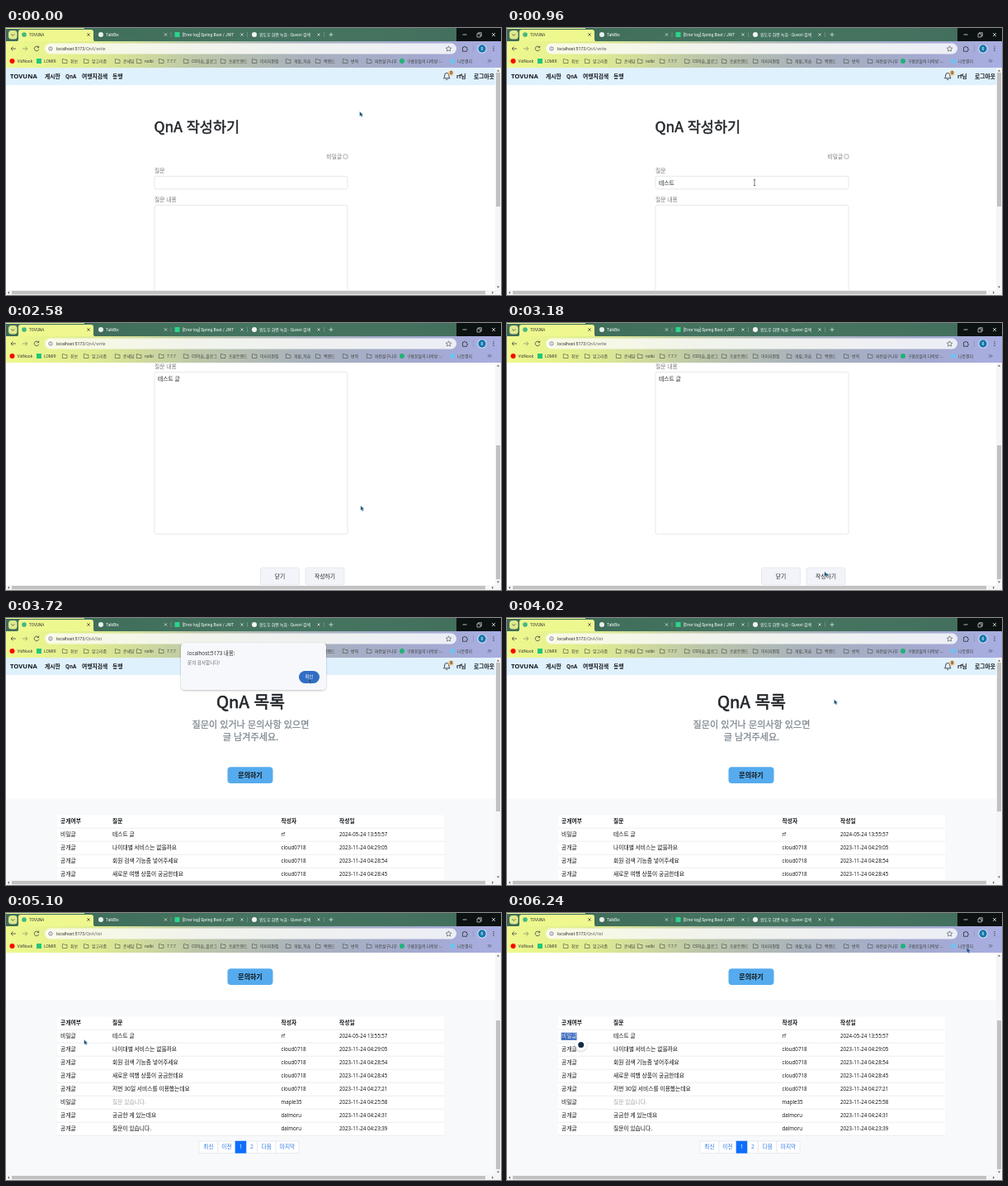
Animation, 600 px wide and 323 px high, one loop 6300 ms. Source, as an HTML page:

```html
<!DOCTYPE html>
<html lang="ko">
<head>
<meta charset="utf-8">
<title>QnA</title>
<style>
  html, body { margin: 0; width: 100%; height: 100%; overflow: hidden; background: #fff; }
  svg { display: block; width: 100vw; height: 100vh; }
  text { font-family: "Open Sans", "Noto Sans CJK KR", "Noto Sans CJK", sans-serif; white-space: pre; }
  .ui text { font-family: Roboto, "Noto Sans CJK KR", "Noto Sans CJK", sans-serif; }
  .head { font-family: "Noto Sans CJK KR", "Noto Sans CJK", sans-serif; }
</style>
</head>
<body>
<svg id="stage" viewBox="0 0 600 323" preserveAspectRatio="none"></svg>
<script>
const LOOP = 6300, STEP = 60;
const BRAND = 'TOVUNA', USER = 'rf';

// Markup helpers; text is placed by its vertical middle.
const rect = (x, y, w, h, fill, more = '') =>
  `<rect x="${x}" y="${y}" width="${w}" height="${h}" fill="${fill}" ${more}/>`;
const circle = (x, y, r, fill, more = '') =>
  `<circle cx="${x}" cy="${y}" r="${r}" fill="${fill}" ${more}/>`;
const line = (d, color, width = .7, more = '') =>
  `<path d="${d}" fill="none" stroke="${color}" stroke-width="${width}" ${more}/>`;
const text = (x, y, size, str, fill = '#15191d', more = '') =>
  `<text x="${x}" y="${y + size * .36}" font-size="${size}" fill="${fill}" ${more}>${str}</text>`;
const group = (id, body, more = '') => `<g id="${id}" ${more}>${body}</g>`;
const cross = (x, y, r, color) => line(`M${x - r} ${y - r}l${2 * r} ${2 * r}m0 ${-2 * r}l${-2 * r} ${2 * r}`, color);
const BOLD = 'font-weight="700"', MID = 'text-anchor="middle"';

// Headings sit between regular and bold, so a regular face gets a thin outline.
const heading = (x, y, size, str, fill, weight, more = '') =>
  text(x, y, size, str, fill, `class="head" stroke="${fill}" stroke-width="${weight}" ${more}`);

function gradient(id, ...stops) {
  const list = stops.map(([at, color]) => `<stop offset="${at}" stop-color="${color}"/>`).join('');
  return `<linearGradient id="${id}" gradientUnits="userSpaceOnUse" x1="0" x2="600" y1="0" y2="0">${list}</linearGradient>`;
}

const defs = `<defs>
  ${gradient('strip', [0, '#3d6b58'], [.5, '#447460'], [.8, '#44725f'], [.91, '#436f5d'])}
  ${gradient('bar', [0, '#eff98d'], [.18, '#dfeb92'], [.38, '#bdc8a8'], [.6, '#a9b2bd'], [.85, '#a3a9d0'], [1, '#a9aee2'])}
  ${gradient('field', [.07, '#f9fbe3'], [.4, '#f1f3ec'], [.9, '#eceef6'])}
  <clipPath id="view"><rect x="0" y="48" width="593" height="269"/></clipPath>
  <clipPath id="tabText"><rect x="0" y="0" width="371" height="16"/></clipPath>
  <filter id="shadow" x="-20%" y="-20%" width="140%" height="150%">
    <feDropShadow dx="0" dy=".8" stdDeviation="1.3" flood-opacity=".28"/>
  </filter>
</defs>`;

function tabStrip() {
  const tab = (x, name, color) => circle(x, 8, 3, color) + text(x + 6, 8.3, 4.9, name, '#fff');
  return rect(0, 0, 600, 17, 'url(#strip)') + rect(546, 0, 54, 16, '#0c1211') + rect(0, 0, 95, 1, '#eef88f') +
    rect(3, 3, 10.5, 10.5, '#dfe98d', 'rx="3.5"') + line('M6.3 7.3l2 2 2-2', '#333') +
    '<path d="M12 16.5q3 0 3-3V5q0-3 3-3h85q3 0 3 3v8.5q0 3 3 3z" fill="#eef88f"/>' +
    circle(22, 8, 2.8, '#41b883') + text(28, 8.3, 4.7, BRAND, '#333') + cross(100, 8, 1.7, '#333') +
    tab(115, 'TalkBix', '#e8efeb') + cross(193.5, 8, 1.6, '#eee') +
    rect(204.5, 5, 6, 6, '#2bd48a') + text(214, 8.3, 4.9, '[Error log] Spring Boot / JWT', '#fff') + cross(286, 8, 1.6, '#eee') +
    group('', tab(301, '윈도우 화면 녹화 - Quvori 검색', '#f4f4f4'), 'clip-path="url(#tabText)"') + cross(379, 8, 1.6, '#eee') +
    line('M200 5v6M292.5 5v6M385.5 5v6', '#8fae9f', .5) +
    line('M391.5 8h5M394 5.5v5', '#eee') +
    line('M553.5 8h5', '#fff') + line('M571 7h4v4h-4zM572.3 7v-1.3h4v4h-1.3', '#fff', .6) + cross(591, 8, 2, '#fff');
}

function toolbar() {
  return rect(0, 16, 600, 17, 'url(#bar)') +
    line('M12 25h-6m2.5-2.5L6 25l2.5 2.5', '#444', .8) +
    line('M20 25h6m-2.5-2.5L26 25l-2.5 2.5', '#8b926a', .8) +
    line('M39.3 23.2a2.8 2.8 0 1 0 .5 2.5M39.7 21.7v2h-2', '#444', .8) +
    rect(47, 18.5, 499, 13, 'url(#field)', 'rx="6.5"') +
    circle(54, 25, 4.4, '#fff') + circle(54, 25, 2.3, 'none', 'stroke="#444" stroke-width=".6"') + line('M54 24.6v1.6M54 23.5v.6', '#444', .6) +
    `<text id="url" x="61" y="27" font-size="5.2" fill="#333"></text>` +
    line('M536.5 21.8l1 2.1 2.3.3-1.7 1.6.4 2.3-2-1.1-2 1.1.4-2.3-1.7-1.6 2.3-.3z', '#444', .6) +
    line('M553.5 23.3h1.5a1 1 0 1 1 2 0h1.5v1.5a1 1 0 1 1 0 2v1.5h-5z', '#333', .8) +
    line('M566.5 21v8', '#7f86a8', .5) +
    circle(577, 25, 5.6, '#e6edf8') + circle(577, 25, 4.7, '#1476ad') + text(577, 25, 4.6, 'R', '#fff', MID) +
    [22.6, 25, 27.4].map(y => circle(591, y, .65, '#333')).join('');
}

function bookmarks() {
  const folders = [[71, '취보'], [97, '알고리즘'], [135, '온새담'], [161, 'nolbi'], [188, '7.7.7'],
    [218, 'CS학습_블로그'], [263, '프론트엔드'], [301, '이미지편집'], [342, '개발_학습'],
    [378, '백엔드'], [411, '번역'], [440, '파란살구나무']];
  const label = (x, name) => text(x, 39.8, 4.9, name, '#3f423c');
  return rect(0, 33, 600, 15, 'url(#bar)') +
    circle(7.5, 40, 3, '#f00') + label(13.5, 'VidNook') +
    rect(37, 37, 6, 6, '#20c77c') + label(46, 'LOMIR') +
    folders.map(([x, name]) => line(`M${x - 2.6} 37.6h2l.8.9h2.8v4h-5.6z`, '#4b4d45', .6) + label(x + 7, name)).join('') +
    circle(480, 40, 3, '#20b27a') + label(486, '구름꾼들의 다락방 :…') +
    circle(541, 40, 3, '#6fc3ee') + label(547, '나뭇결지') +
    line('M584 38l1.8 1.8-1.8 1.8M586.3 38l1.8 1.8-1.8 1.8', '#333', .6);
}

function siteNav() {
  const item = (x, name, size = 6.8) => text(x, 58.5, size, name, '#15191d', BOLD);
  return rect(0, 48, 593, 21, '#e0f1fe') + item(5, BRAND, 7.7) + item(47, '게시판') + item(72, 'QnA', 6.2) +
    item(92, '여행지검색') + item(129, '동행') + item(546, USER + '님', 6.5) + item(567, '로그아웃') +
    line('M530.5 60.8h7.5q-1.2-1.2-1.2-3.8a2.55 2.55 0 0 0-5.1 0q0 2.6-1.2 3.8zM533.2 62q1 1.3 2.1 0', '#222', .8) +
    circle(539.5, 54.5, 3.3, '#f3c98c') + text(539.5, 54.5, 4.6, '0', '#222', MID + ' ' + BOLD);
}

function writePage() {
  const box = (y, h) => rect(180, y, 234, h, '#fff', 'rx="2.2" stroke="#d9dfe3" stroke-width=".7"');
  const button = (x, name) => rect(x, 451, 47, 21, '#f3f4f9', 'rx="2.5" stroke="#e0e3ec" stroke-width=".7"') +
    text(x + 23.5, 461.5, 6.8, name, '#212529', MID);
  return siteNav() + heading(179.5, 119.6, 17.5, 'QnA 작성하기', '#212529', .5) +
    text(388.5, 155.5, 6.8, '비밀글', '#777') +
    rect(409, 153, 5, 5, '#fff', 'id="check" rx="1" stroke-width=".7"') +
    line('M410.2 155.6l1 1 1.8-2', '#fff', .7, 'id="tick"') +
    text(180, 172.5, 6.8, '질문', '#777') + box(179.3, 15.5) +
    text(180, 207.5, 6.8, '질문 내용', '#777') + box(214.3, 196) +
    text(184, 187.5, 6.8, '', '#212529', 'id="subject"') + text(184, 223, 6.8, '', '#212529', 'id="body"') +
    button(308.5, '닫기') + button(363, '작성하기');
}

function listPage() {
  const rows = [
    ['비밀글', '테스트 글', USER, '2024-05-24 13:55:57'],
    ['공개글', '나이대별 서비스는 없을까요', 'cloud0718', '2023-11-24 04:29:05'],
    ['공개글', '회원 검색 기능좀 넣어주세요', 'cloud0718', '2023-11-24 04:28:54'],
    ['공개글', '새로운 여행 상품이 궁금한데요', 'cloud0718', '2023-11-24 04:28:45'],
    ['공개글', '저번 30일 서비스를 이용했는데요', 'cloud0718', '2023-11-24 04:27:21'],
    ['비밀글', '질문 있습니다.', 'maple35', '2023-11-24 04:25:58'],
    ['공개글', '궁금한 게 있는데요', 'dalmoru', '2023-11-24 04:24:31'],
    ['공개글', '질문이 있습니다.', 'dalmoru', '2023-11-24 04:23:39']];
  const columns = [66, 129, 333.5, 404];
  const row = (cells, i) => cells.map((cell, c) =>
    text(columns[c], 262 + 16 * i, c < 2 ? 6.75 : 6.2, cell, i === 5 && c === 1 ? '#a2a5a8' : '#0b0d0f')).join('') +
    line(`M62 ${270.2 + 16 * i}h469`, '#dee2e6', .6);
  const header = ['공개여부', '질문', '작성자', '작성일'].map((name, c) => text(columns[c], 246, 6.75, name, '#15191d', BOLD)).join('');
  const pages = [[234, 23, '최신'], [257, 21, '이전'], [278, 13.5, '1'], [291.5, 13, '2'], [304.5, 22.5, '다음'], [327, 28, '마지막']];
  const pager = pages.map(([x, w, name]) => {
    const on = name === '1';
    return rect(x, 389, w, 14.3, on ? '#0d6efd' : '#fff', `stroke="${on ? '#0d6efd' : '#dee2e6'}" stroke-width=".6"`) +
      text(x + w / 2, 396, 6.7, name, on ? '#fff' : '#2f78e8', MID);
  }).join('');
  const lead = (y, str) => heading(296.5, y, 11.1, str, '#7b858e', .25, MID);
  return siteNav() + rect(0, 218.5, 593, 220, '#f7f9fb') +
    heading(296.5, 101.5, 20.4, 'QnA 목록', '#212529', .6, MID) +
    lead(129, '질문이 있거나 문의사항 있으면') + lead(144, '글 남겨주세요.') +
    rect(268.5, 180.3, 55, 19.7, '#55abee', 'rx="4"') + text(296, 190, 8, '문의하기', '#111', `${BOLD} ${MID}`) +
    rect(62, 238.5, 469, 143.7, '#fff') + header + line('M62 254.2h469', '#dee2e6', .6) +
    rows.map(row).join('') + pager +
    group('picked', rect(65.7, 257.7, 18.8, 9, '#2f62b8') + text(66, 262, 6.75, '비밀글', '#fff'));
}

const scrollbars = rect(593, 48, 7, 275, '#f5f5f5') + rect(0, 317, 600, 6, '#f5f5f5') +
  rect(594, 54, 5, 10, '#c1c1c1', 'id="thumb"') + rect(7, 318, 574, 4.2, '#c1c1c1') +
  '<path d="M594.8 52.5l1.7-2 1.7 2zM594.8 312.5l1.7 2 1.7-2zM4 318.5l-2 1.6 2 1.6zM589 318.5l2 1.6-2 1.6z" fill="#666"/>';

const alertBox = rect(212, 30, 176, 57, '#f6f8fc', 'rx="5" filter="url(#shadow)"') +
  text(220, 43, 6.3, 'localhost:5173 내용:', '#222') + text(220, 54, 5.6, '문의 감사합니다!', '#666') +
  rect(355, 64, 25, 15, '#316dc3', 'rx="7.5"') + text(367.5, 71.5, 5.4, '확인', '#fff', MID);

const helper = circle(0, 0, 7, '#fff', 'filter="url(#shadow)"') + circle(0, 0, 3.5, '#0f2b46');

document.getElementById('stage').innerHTML = defs + rect(0, 0, 600, 323, '#fff') +
  group('', group('write', writePage()) + group('list', listPage()) + group('helper', helper), 'clip-path="url(#view)"') +
  scrollbars + group('', tabStrip() + toolbar() + bookmarks(), 'class="ui"') + group('alert', alertBox) +
  group('arrow', '<path d="M0 0v5.3l1.3-1.1.9 1.9 1-.5-.9-1.8h1.6z" fill="#1b4c69" stroke="#62a9cf" stroke-width=".35"/>') +
  group('beam', line('M-1.2-3.5h2.4M0-3.5v7M-1.2 3.5h2.4', '#222', .6));

const el = Object.fromEntries([...document.querySelectorAll('[id]')].map(node => [node.id, node]));
const show = (node, on) => node.setAttribute('display', on ? 'inline' : 'none');
const move = (node, x, y) => node.setAttribute('transform', `translate(${x} ${y})`);
const ease = u => u * u * (3 - 2 * u);
const ramp = (t, from, to) => ease(Math.min(1, Math.max(0, (t - from) / (to - from))));

// Pointer stops: time, x, y
const path = [[0, 428.8, 101.3], [180, 428.8, 101.3], [540, 300, 187], [1140, 300, 187], [1320, 296, 215],
  [1620, 296, 215], [1800, 413.3, 155], [1980, 413.3, 155], [2220, 430, 221.3], [2640, 430, 221.3],
  [2940, 385, 301], [3420, 385, 301], [3660, 367, 73.3], [3840, 367, 73.3], [4140, 412.8, 112.5],
  [4620, 412.8, 112.5], [5040, 94.8, 153.5], [5220, 94.8, 153.5], [5400, 80, 149], [5820, 80, 149],
  [6180, 557.5, 42.3], [6300, 557.5, 42.3]];

function pointerAt(t) {
  const i = path.findIndex(stop => stop[0] > t);
  const [t0, x0, y0] = path[i - 1], [t1, x1, y1] = path[i], u = ramp(t, t0, t1);
  return [x0 + (x1 - x0) * u, y0 + (y1 - y0) * u];
}

function typed(t, start) {
  const stages = ['', 'ㅌ', '테', '테스', '테스트', '테스트 ', '테스트 글'];
  return stages[Math.min(6, Math.max(0, Math.floor((t - start) / STEP)))];
}

function render(t) {
  const listing = t >= 3420;
  const scroll = listing ? 113 * ramp(t, 4080, 4300) : 155 * ramp(t, 2160, 2460);
  show(el.write, !listing);
  show(el.list, listing);
  move(listing ? el.list : el.write, 0, -scroll);
  el.url.innerHTML = `localhost:5173<tspan fill="#666">/QnA/${listing ? 'list' : 'write'}</tspan>`;

  const thumb = listing ? 180 : 162;
  el.thumb.setAttribute('height', thumb);
  el.thumb.setAttribute('y', 54 + scroll * (256 - thumb) / (listing ? 113 : 155));

  el.subject.textContent = typed(t, 660);
  el.body.textContent = typed(t, 1260);
  const checked = t >= 1920;
  el.check.setAttribute('fill', checked ? '#0d6efd' : '#fff');
  el.check.setAttribute('stroke', checked ? '#0d6efd' : t >= 1800 ? '#86b7fe' : '#8d9499');
  show(el.tick, checked);

  show(el.alert, t >= 3480 && t < 3840);
  show(el.picked, t >= 5460);
  show(el.helper, (t >= 1380 && t < 1920) || t >= 5580);
  move(el.helper, ...(listing ? [89.7, 159.5] : [405.5, 315.5]));

  const [x, y] = pointerAt(t);
  const overText = (t >= 500 && t < 1680) || (t >= 5340 && t < 5880);
  show(el.arrow, !overText);
  show(el.beam, overText);
  move(el.arrow, x, y);
  move(el.beam, x, y);
}

const start = performance.now();
function tick() {
  const t = (performance.now() - start) % LOOP;
  render(Math.floor(t / STEP) * STEP);
  requestAnimationFrame(tick);
}
tick();
</script>
</body>
</html>
```
